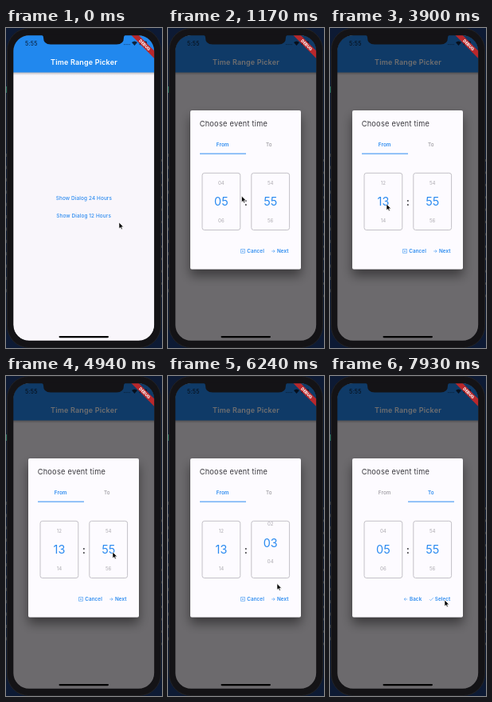
Write an HTML page that moves like this. It is 196 px wide and 400 px high and loops after 8000 ms.

```html
<!DOCTYPE html>
<html lang="en">
<head>
<meta charset="utf-8">
<title>Time range picker</title>
<style>
html, body { margin: 0; width: 100%; height: 100%; overflow: hidden; background: #0d1a34; }
svg { display: block; }
text { font-family: Inter, Roboto, sans-serif; }
.mid { text-anchor: middle; }
.blue { fill: #2b8bf0; }
.btn { font-size: 6.3px; font-weight: 600; letter-spacing: .1px; }
.line { fill: none; stroke: #2b8bf0; stroke-width: .55; }
.box { fill: none; stroke: #c3c1c7; }
</style>
</head>
<body>
<svg width="196" height="400" viewBox="0 0 196 400">
  <defs>
    <clipPath id="screen"><rect x="9" y="9" width="177.5" height="382" rx="20"/></clipPath>
    <linearGradient id="barShade" x2="0" y2="1">
      <stop stop-color="#000" stop-opacity=".28"/><stop offset="1" stop-color="#000" stop-opacity="0"/>
    </linearGradient>
    <filter id="lift" x="-30%" y="-30%" width="160%" height="160%">
      <feDropShadow dx="0" dy="8" stdDeviation="7" flood-opacity=".45"/>
    </filter>
  </defs>

  <g id="backdrop" fill="#343c48"></g>
  <rect x="1.5" y=".5" width="193" height="399" rx="27" fill="#141316" stroke="#222225"/>

  <g clip-path="url(#screen)">
    <rect x="9" y="9" width="178" height="383" fill="#f9f6fb"/>
    <rect x="9" y="55" width="178" height="4" fill="url(#barShade)"/>
    <rect x="9" y="9" width="178" height="46.5" fill="#2188ee"/>
    <g fill="#0c2440">
      <text x="24" y="22.4" font-size="7" font-weight="500" letter-spacing=".2">5:55</text>
      <path d="M148 20.6h8" stroke="#0c2440" stroke-dasharray="1.3 1" opacity=".6"/>
      <path d="M158 18Q161.5 14.8 165 18L161.5 22Z"/>
      <rect x="167.5" y="16.5" width="9.5" height="4.8" rx="1.4"/>
    </g>
    <text class="mid" x="98" y="46.2" font-size="9" font-weight="600" letter-spacing=".17" fill="#fff">Time Range Picker</text>
    <g class="mid blue" font-size="6.4" font-weight="500" letter-spacing=".12">
      <text x="97.9" y="214.5">Show Dialog 24 Hours</text>
      <text x="97.6" y="237.2">Show Dialog 12 Hours</text>
    </g>

    <g id="modal">
      <rect x="9" y="9" width="178" height="383" fill="#030002" opacity=".57"/>
      <rect x="28" y="103" width="139" height="198.5" rx="2" fill="#fdfbff" filter="url(#lift)"/>
      <text x="39.7" y="123.3" font-size="9.2" letter-spacing=".26" fill="#38373c">Choose event time</text>
      <text class="mid btn tab" x="68.7" y="148.3">From</text>
      <text class="mid btn tab" x="126.8" y="148.3">To</text>
      <rect id="ink" y="156.6" width="58" height="1" class="blue"/>
      <svg x="40" y="170" width="116" height="94" viewBox="40 170 116 94">
        <g id="pages"></g>
      </svg>
      <g class="actions">
        <path class="line" d="M91.5 276.5h5v4.8h-5zM92.9 277.8l2.2 2.2m0-2.2l-2.2 2.2M130.2 279h4m-1.8-1.8l1.8 1.8-1.8 1.8"/>
        <g class="btn blue"><text x="99.2" y="281.3">Cancel</text><text x="136.9" y="281.3">Next</text></g>
      </g>
      <g class="actions">
        <path class="line" d="M97.2 279h-4m1.8-1.8l-1.8 1.8 1.8 1.8M125 279.2l1.5 1.5 3.4-3.5"/>
        <g class="btn blue"><text x="99.9" y="281.3">Back</text><text x="131.7" y="281.3">Select</text></g>
      </g>
    </g>

    <g transform="translate(186.5 9) rotate(45)">
      <rect x="-21" y="14" width="42" height="6.6" fill="#b8282c"/>
      <text class="mid" y="19.1" font-size="5" font-weight="800" fill="#fff">DEBUG</text>
    </g>
  </g>

  <rect x="8.6" y="8.6" width="178.3" height="382.8" rx="20.4" fill="none" stroke="#141316" stroke-width="1.4"/>
  <path d="M44 8.5Q47 9 47 12Q47 20.5 56 20.5H139Q148 20.5 148 12Q148 9 151 8.5Z" fill="#141316"/>
  <rect x="66.5" y="385" width="62.5" height="2.2" rx="1.1"/>
  <path id="cursor" d="M0 0V7.8L1.8 6.2 3 8.8 4.3 8.2 3.1 5.7H5.6Z" stroke="#fff" stroke-width=".6"/>
</svg>
<script>
const LOOP = 8000, STEP = 23.5, MID = 217;
const $ = s => document.querySelector(s), all = s => [...document.querySelectorAll(s)];

// 0 to 1, smoothly, from a start time over a span in ms
function glide(t, start, span) {
  const p = Math.max(0, Math.min(1, (t - start) / span));
  return p * p * (3 - 2 * p);
}

// up and back down again: the hand dragging a wheel
const stroke = (t, start, span) => Math.sin(Math.PI * glide(t, start, span)) ** 2;

const hour = t => 5 + 3.43 * glide(t, 2000, 420) - .43 * glide(t, 2520, 200) + 5 * glide(t, 2950, 690);
const minute = t => 55 + 4 * glide(t, 4980, 400) + 4.35 * glide(t, 5560, 500) - .35 * glide(t, 6260, 200);

// start, span, x, y of each place the pointer visits
const visits = [
  [130, 750, 92.5, 210], [1250, 600, 69.5, 230], [3500, 350, 71, 220],
  [4000, 600, 134, 220], [5860, 380, 137, 259.5], [6300, 400, 144, 280]
];

function pointer(t) {
  let x = 142, y = 243;
  for (const [start, span, toX, toY] of visits) {
    const p = glide(t, start, span);
    x += (toX - x) * p;
    y += (toY - y) * p;
  }
  const drag = 44 * (stroke(t, 2000, 900) + stroke(t, 2950, 800))
             + 32 * (stroke(t, 4960, 600) + stroke(t, 5560, 600));
  return [x, y - drag];
}

const wheel = x => `<rect class="box" x="${x}" y="181.3" width="47.8" height="71.2" rx="2.8"/>
  <svg class="wheel" x="${x}" y="181.8" width="47.8" height="70.2" viewBox="-23.9 181.8 47.8 70.2">${'<text class="mid"></text>'.repeat(5)}</svg>`;

const page = x => `<g transform="translate(${x})">${wheel(43)}${wheel(104.8)}
  <text class="mid" x="97.9" y="222" font-size="14" font-weight="500" fill="#38373c">:</text></g>`;

$('#pages').innerHTML = page(0) + page(116);
$('#backdrop').innerHTML = Array.from({ length: 12 }, (_, i) =>
  `<rect y="${157 + i * 15.4}" width="1" height="4"/><rect x="195" y="${164 + i * 15.4}" width="1" height="3"/>`
).join('') + '<rect y="73" width="1.5" height="8" fill="#25735f"/>';

const wheels = all('.wheel'), tabs = all('.tab'), actions = all('.actions');

function turn(el, pos, size) {
  const near = Math.round(pos);
  [...el.children].forEach((item, i) => {
    const n = near + i - 2, chosen = i === 2, font = chosen ? 14.4 : 6.1;
    item.textContent = String((n + size) % size).padStart(2, '0');
    item.setAttribute('y', MID + (n - pos) * STEP + font * .364);
    item.setAttribute('font-size', font);
    item.setAttribute('fill', chosen ? '#2b8bf0' : '#adabb1');
  });
}

function draw(t) {
  $('#cursor').setAttribute('transform', `translate(${pointer(t)})`);
  $('#modal').setAttribute('opacity', glide(t, 1000, 150));

  turn(wheels[0], hour(t), 24);
  turn(wheels[1], minute(t), 60);

  const slide = glide(t, 7400, 300), second = slide > .5;
  $('#pages').setAttribute('transform', `translate(${-116 * slide})`);
  $('#ink').setAttribute('x', 40 + 58 * slide);
  tabs.forEach((tab, i) => {
    const on = i === +second;
    tab.setAttribute('fill', on ? '#2b8bf0' : '#9a989e');
    tab.style.fontWeight = on ? 600 : 500;
    actions[i].setAttribute('visibility', on ? 'visible' : 'hidden');
  });
}

turn(wheels[2], 5, 24);
turn(wheels[3], 55, 60);

const start = performance.now();
(function frame() {
  draw((performance.now() - start) % LOOP);
  requestAnimationFrame(frame);
})();
</script>
</body>
</html>
```
